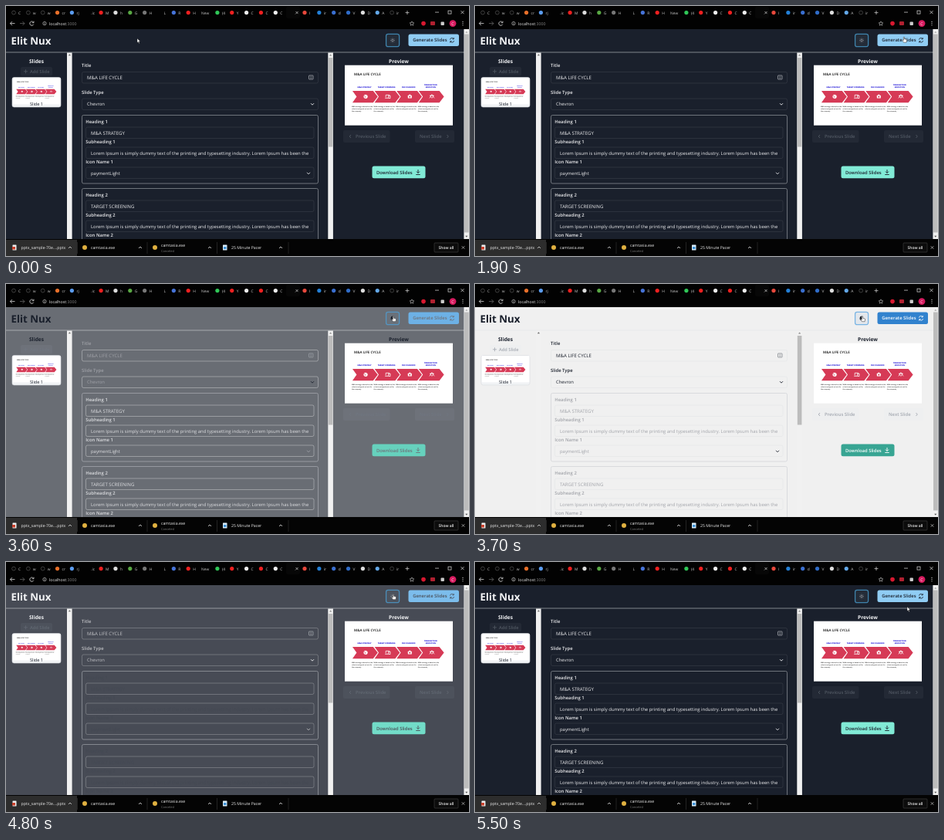
An HTML page for the animation above (5.6 s loop, 600 px wide and 324 px high).

```html
<!DOCTYPE html>
<html lang="en">
<head>
<meta charset="utf-8">
<title>Slide generator</title>
<style>
html, body { margin: 0; width: 100%; height: 100%; overflow: hidden; background: #000; }
svg { display: block; width: 100vw; height: 100vh; font-family: "Open Sans", "Noto Sans", sans-serif; text-rendering: geometricPrecision; }
</style>
</head>
<body>
<svg id="stage" viewBox="0 0 600 324"></svg>
<script>
const LOOP = 5600, STEP = 100, TO_LIGHT = 3530, TO_DARK = 4680;
const stage = document.getElementById('stage');

// name: [speed, dark, light]
const palette = {
  bg: ['body', '#1a202c', '#f0f0f0'],
  rule: ['body', '#8e9197', '#e6e7e9'],
  head: ['now', '#f2f3f5', '#1a202c'],
  text: ['body', '#ededef', '#1a202c'],
  cardText: ['card', '#ededef', '#1a202c'],
  border: ['body', '#ffffff1a', '#e6e7e9ff'],
  cardBorder: ['body', '#858990', '#d3d5d8'],
  hint: ['body', '#a4a8ae', '#85898f'],
  off: ['body', '#232935', '#eeeff0'],
  offText: ['body', '#515863', '#a4a9b1'],
  gen: ['body', '#90cdf4', '#3182ce'],
  down: ['body', '#81ead6', '#38a593'],
  btnText: ['body', '#1a202c', '#ffffff'],
  toggle: ['body', '#242c38', '#e3e7ec'],
  ring: ['body', '#3f83ac', '#78b4e4'],
  icon: ['now', '#d5d8dc', '#1a202c']
};
const paint = c => palette[c] ? `var(--${c})` : c;

const rect = (x, y, w, h, fill, r = 0, stroke = 'none', sw = .8) =>
  `<rect x="${x}" y="${y}" width="${w}" height="${h}" rx="${r}" style="fill:${paint(fill)};stroke:${paint(stroke)};stroke-width:${sw}"/>`;
const text = (x, y, s, fill = 'text', size = 5.9, weight = 400, anchor = 'start') =>
  `<text x="${x}" y="${y}" font-size="${size}" font-weight="${weight}" text-anchor="${anchor}" style="fill:${paint(fill)}">${s.replace(/&/g, '&amp;')}</text>`;
const line = (d, color, w = .8) =>
  `<path d="${d}" style="fill:none;stroke:${paint(color)};stroke-width:${w}"/>`;
const shape = (d, fill) => `<path d="${d}" style="fill:${paint(fill)}"/>`;
const dot = (x, y, r, fill, stroke = 'none') =>
  `<circle cx="${x}" cy="${y}" r="${r}" style="fill:${paint(fill)};stroke:${paint(stroke)};stroke-width:.7"/>`;
const caret = (x, y, color, up) => line(`M${x - 2} ${y + (up ? 1 : -1)}l2 ${up ? -2 : 2}l2 ${up ? 2 : -2}`, color, .9);
const cross = (x, y, r, color) => line(`M${x - r} ${y - r}l${2 * r} ${2 * r}m0 ${-2 * r}l${-2 * r} ${2 * r}`, color, .7);
const group = (move, inner) => `<g transform="${move}">${inner}</g>`;

function browserTop() {
  // fill ("-" means ring only), label
  const tabs = [['-', 'C'], ['-', 'w'], ['-', 'w'], ['#e8702a', 'cr'], ['#5b9cf0', 'rj'], ['', '.ic'], ['#f02020', 'M'],
    ['#ddd', 'h'], ['#59a844', 'G'], ['#777', 'H'], ['', 'L'], ['#4673d8', 'R'], ['#f02020', 'H'], ['', 'New'],
    ['#30c858', '(4'], ['#f02020', 'Y'], ['#eee', 'C'], ['#f02020', 'C'], ['#eee', 'C'], ['', '.'], ['#e8483c', 'I'],
    ['#2380d8', 'ir'], ['#3a6fd0', 'd'], ['#2f6cc8', 'V'], ['#ddd', 'D'], ['#63a8e8', 'A'], ['-', 'ir']];
  let s = '';
  tabs.forEach(([c, label], i) => {
    const x = 10 + 18.85 * i;
    if (c === '-') s += dot(x, 9, 2.4, 'none', '#555');
    else if (c) s += dot(x, 9, 2.6, c);
    s += text(x + (label === 'New' ? -2 : 6), 11, label, '#c8c8c8', 4.9);
  });
  s += cross(377, 9, 1.5, '#ddd') + line('M517.5 9h5m-2.5-2.5v5', '#ddd', .7);
  s += line('M556 8.5h5', '#ddd', .7) + rect(573, 6.5, 4, 4, 'none', 0, '#ddd', .7) + cross(591.5, 8.6, 2, '#eee');
  s += line('M11.5 23h-6m2.5-2.5l-2.5 2.5l2.5 2.5', '#ddd') + line('M18 23h6m-2.5-2.5l2.5 2.5l-2.5 2.5', '#666');
  s += line('M35.5 21.5a2.6 2.6 0 1 0 .3 2.6m.2-4v2h-2', '#ddd');
  s += dot(50, 23, 2.2, 'none', '#bbb') + line('M50 22.4v2m0-3.2v.6', '#bbb', .7);
  s += `<text x="56" y="25" font-size="5.25" fill="#eee">localhost<tspan fill="#888">:3000</tspan></text>`;
  s += line('M526 20.2l.8 1.9 2 .2-1.5 1.3.5 2-1.8-1.1-1.8 1.1.5-2-1.5-1.3 2-.2z', '#ccc', .6);
  s += dot(541, 23, 2.8, '#d81830') + rect(550, 20.5, 6, 5, '#b02030', 1) + rect(563.5, 21, 4.4, 4.4, '#ccc', .8);
  s += dot(579, 23, 4.4, '#d81b60') + text(579, 25, 'C', '#fff', 5.2, 400, 'middle');
  s += [20.8, 23, 25.2].map(y => dot(592, y, .6, '#ddd')).join('');
  return rect(0, 0, 600, 30, '#020202') + rect(363, 1, 18, 15, '#070707', 2) + group('translate(0 -.4)', s);
}

function shelf() {
  let s = rect(0, 302, 600, 22, '#040404') + rect(0, 303, 92, 21, '#2d2d2d');
  s += [92.5, 183, 273.5, 366].map(x => line(`M${x} 306v15`, '#383838', .6)).join('');
  s += [83, 174, 264, 356].map(x => caret(x, 313, '#ccc', true)).join('');
  s += rect(8.5, 309.5, 5, 7, '#eee', .5) + rect(8, 312, 4, 3.5, '#c8402c');
  s += text(19.5, 315.2, 'pptx_sample-70e....pptx', '#eee', 5.2);
  s += dot(102, 313, 3, '#e0b040') + text(110, 315.2, 'camtasia.exe', '#eee', 5.2);
  s += dot(193, 313, 3, '#e0b040') + text(201, 312, 'camtasia.exe', '#eee', 5.2) + text(201, 318.8, 'Canceled', '#777', 4);
  s += rect(281, 309.5, 5.5, 7, '#d8ecfa', .5) + rect(282, 312, 3.5, 3, '#3f93d8');
  s += text(292, 315.2, '25 Minute Pacer', '#eee', 5.2);
  s += rect(555, 307, 31, 12, '#0c0c0c', 1, '#444', .6) + text(570.5, 315, 'Show all', '#eee', 5, 600, 'middle');
  return s + cross(592.5, 313, 1.8, '#ccc');
}

// Slide artwork in its own 140 x 78 space.
function slide() {
  const heads = [['M&A STRATEGY'], ['TARGET SCREENING'], ['DUE DILIGENCE'], ['TRANSACTION', 'EXECUTION']];
  const notes = ['M&A strategy is based on the', 'criteria and goals set out for', 'the company'];
  const icons = [
    dot(0, 0, 2.6, '#fff') + line('M-2 -1l2 1l-1 2m2-4l1 1', '#d63a56', .6),
    line('M-2.5 1v-3h5m-6 4h4', '#fff') + rect(1, -1, 2.2, 3.2, 'none', 0, '#fff'),
    rect(-2.5, -1.6, 5, 3.8, '#fff', .5) + dot(0, .3, 1.1, '#d63a56') + rect(-1, -2.6, 2, 1.4, '#fff'),
    dot(-1.6, -.8, 1.1, '#fff') + dot(1.6, -.8, 1.1, '#fff') + dot(0, -2, .9, '#fff') + line('M-3.2 2l1.6-1.6l1.6 1.6l1.6-1.6l1.6 1.6', '#fff')
  ];
  let s = rect(0, 0, 140, 78, '#fff') + text(12, 13.5, 'M&A LIFE CYCLE', '#111', 4.5, 600);
  heads.forEach((h, i) => {
    const x = 10 + 28.6 * i, mid = x + 16.5;
    h.forEach((t, j) => { s += text(mid - 1, 29 + (j - h.length + 1) * 3, t, '#2419d8', 2.3, 800, 'middle'); });
    s += shape(`M${x} 33.3h26.8l6 7.6l-6 7.6h-26.8l5.4-7.6z`, '#d63a56');
    s += group(`translate(${mid + .6} 40.6)`, icons[i]);
    notes.slice(0, i === 2 ? 2 : 3).forEach((t, j) => { s += text(x - 1, 54.4 + 3 * j, t, '#222', 1.95, 600); });
  });
  return s;
}

function fieldCard(n, title, y) {
  let s = rect(98.5, y + .5, 306, 88.5, 'none', 2, 'cardBorder');
  [16, 42, 68].forEach(dy => { s += rect(103.5, y + dy, 295.5, 14.5, 'none', 2, 'border'); });
  ['Heading', 'Subheading', 'Icon Name'].forEach((t, i) => {
    s += text(103.3, y + 11.1 + 26 * i, `${t} ${n}`, 'cardText', 5.9, 600);
  });
  s += text(110, y + 25.8, title, 'cardText', 6.1);
  s += text(110, y + 51.8, 'Lorem Ipsum is simply dummy text of the printing and typesetting industry. Lorem Ipsum has been the', 'cardText', 5.92);
  return s + text(110, y + 78, 'paymentLight', 'cardText') + caret(392, y + 75.8, 'text');
}

function form() {
  let s = text(98, 79.4, 'Title', 'text', 5.9, 600) + rect(98.5, 85.5, 306, 14.5, 'none', 2, 'border');
  s += text(105, 95.1, 'M&A LIFE CYCLE', 'text', 6.1);
  s += rect(392.5, 90, 5.5, 5, 'none', .5, 'hint') + line('M394 91.8h2.5m-2.5 1.6h2.5', 'hint', .6);
  s += text(98, 113.8, 'Slide Type', 'text', 5.9, 600) + rect(98.5, 120, 306, 14.5, 'none', 2, 'border');
  s += text(105, 129.4, 'Chevron') + caret(397, 127.2, 'head');
  return s + fieldCard(1, 'M&A STRATEGY', 141) + fieldCard(2, 'TARGET SCREENING', 236);
}

function scrollbars() {
  const track = (x, y) => rect(x, y, 6.6, 302 - y, '#f1f1f1');
  const thumb = (x, y, h) => rect(x, y, 5.6, h, '#bcbcbc');
  let s = track(79, 60.5) + track(417.3, 60.5) + track(593.4, 30) + thumb(417.8, 67, 115.5) + thumb(594, 36.5, 257);
  s += shape('M80.8 64.2l1.6-2l1.6 2z', '#666') + shape('M419 64.6l1.6-2l1.6 2z', '#888');
  return s + shape('M595.2 34.8l1.6-2l1.6 2z', '#aaa') + shape('M595.2 297.8h3.2l-1.6 2z', '#555');
}

function app() {
  const refresh = 'M575.4 43.6a2.5 2.5 0 0 1 4.6-1m.3-1.6v1.9h-1.9M580.6 45a2.5 2.5 0 0 1-4.6 1m-.3 1.6v-1.9h1.9';
  let s = rect(0, 30, 600, 273, 'bg') + form() + line('M0 60h594', 'rule', .9);
  s += text(6.5, 50.3, 'Elit Nux', 'head', 13.3, 700);
  s += rect(492.6, 36.3, 17, 16.4, 'toggle', 2.5, 'ring', 1.3);
  let rays = '';
  for (let a = 0; a < 8; a++) {
    const c = Math.cos(a * Math.PI / 4), n = Math.sin(a * Math.PI / 4);
    rays += `M${2 * c} ${2 * n}L${2.9 * c} ${2.9 * n}`;
  }
  s += `<g id="sun" transform="translate(501 44.5)">${dot(0, 0, 1.3, 'none', 'hint') + line(rays, 'hint', .6)}</g>`;
  s += `<g id="moon">${shape('M501.5 41.6a3 3 0 1 0 2.6 4.4a2.7 2.7 0 0 1-2.6-4.4z', 'icon')}</g>`;
  s += rect(521.5, 36.5, 65.5, 15.5, 'gen', 2.5) + text(527.2, 46.4, 'Generate Slides', 'btnText', 5.9, 600) + line(refresh, 'btnText');

  s += text(39.5, 74.2, 'Slides', 'head', 6.6, 700, 'middle');
  s += rect(19, 79, 41, 11.5, 'off', 2) + line('M23 84.8h5m-2.5-2.5v5', 'offText') + text(31, 86.9, 'Add Slide', 'offText', 5.7, 600);
  s += rect(8, 92.5, 63, 38.5, '#f1f3f5', 2.5, '#d9dbdf', .6) + group('translate(8.8 93) scale(.44)', slide());
  s += text(39.5, 129.4, 'Slide 1', '#1a202c', 5.6, 400, 'middle');

  s += text(509, 74.2, 'Preview', 'head', 6.6, 700, 'middle') + group('translate(439 76.7)', slide());
  s += rect(437, 161, 60.5, 16, 'off', 2) + text(453, 171, 'Previous Slide', 'offText', 5.9, 600);
  s += line('M447 167l-1.8 2l1.8 2', 'offText', .9);
  s += rect(530, 161, 51, 16, 'off', 2) + text(536, 171, 'Next Slide', 'offText', 5.9, 600);
  s += line('M571.5 167l1.8 2l-1.8 2', 'offText', .9);
  s += rect(474.5, 207.5, 69, 15.8, 'down', 2.5) + text(480, 217.6, 'Download Slides', 'btnText', 5.9, 600);
  s += line('M534 212v4.5m-2-2l2 2l2-2m-4.7 4h5.4', 'btnText', .9);
  return s + scrollbars();
}

const pointers =
  `<g id="arrow"><path d="M0 0v5.6l1.3-1.2l1 2.2l.9-.4l-1-2.1h1.8z" fill="#fff" stroke="#111" stroke-width=".4"/></g>` +
  `<g id="hand"><path d="M-.7 -2.6q.7-.8 1.3 0v2.4l2.3.5q.8.3.7 1.2l-.5 2.7h-3.6l-1.9-2.6q.2-.8 1-.4l.7.5z" fill="#fff" stroke="#222" stroke-width=".5"/></g>`;

stage.innerHTML = app() + browserTop() + shelf() + pointers;
const [sun, moon, arrow, hand] = ['sun', 'moon', 'arrow', 'hand'].map(id => document.getElementById(id));

const smooth = x => { x = Math.max(0, Math.min(1, x)); return x * x * (3 - 2 * x); };
const lightness = (t, ms) => smooth((t - TO_LIGHT) / ms) - smooth((t - TO_DARK) / ms);
const channels = c => (c.slice(1) + 'ff').match(/../g).slice(0, 4).map(h => parseInt(h, 16));
function mix(dark, light, k) {
  const b = channels(light);
  const [r, g, bl, a] = channels(dark).map((v, i) => Math.round(v + (b[i] - v) * k));
  return `rgba(${r},${g},${bl},${a / 255})`;
}

// time, x, y
const path = [[0, 170, 42], [300, 172, 42], [1700, 556, 43], [2100, 556, 43], [2700, 502, 44.5], [4900, 502, 44.5], [5500, 560, 58]];
function pointerAt(t) {
  let i = 0;
  while (i < path.length - 2 && t >= path[i + 1][0]) i++;
  const [a, b] = [path[i], path[i + 1]], k = smooth((t - a[0]) / (b[0] - a[0]));
  return [a[1] + (b[1] - a[1]) * k, a[2] + (b[2] - a[2]) * k];
}
const inside = (x, y, l, r) => x > l && x < r && y > 36 && y < 52;

function draw(time) {
  const t = Math.floor(time % LOOP / STEP) * STEP;
  const level = { now: t >= TO_LIGHT && t < TO_DARK ? 1 : 0, body: lightness(t, 170), card: lightness(t, 420) };
  for (const name in palette) {
    const [speed, dark, light] = palette[name];
    stage.style.setProperty('--' + name, mix(dark, light, level[speed]));
  }
  sun.style.display = level.now ? 'none' : '';
  moon.style.display = level.now ? '' : 'none';

  const [x, y] = pointerAt(t), over = inside(x, y, 492, 510) || inside(x, y, 521, 587);
  arrow.style.display = over ? 'none' : '';
  hand.style.display = over ? '' : 'none';
  (over ? hand : arrow).setAttribute('transform', `translate(${x} ${y})`);
}

const start = performance.now();
function tick() {
  draw(performance.now() - start);
  requestAnimationFrame(tick);
}
tick();
</script>
</body>
</html>
```
